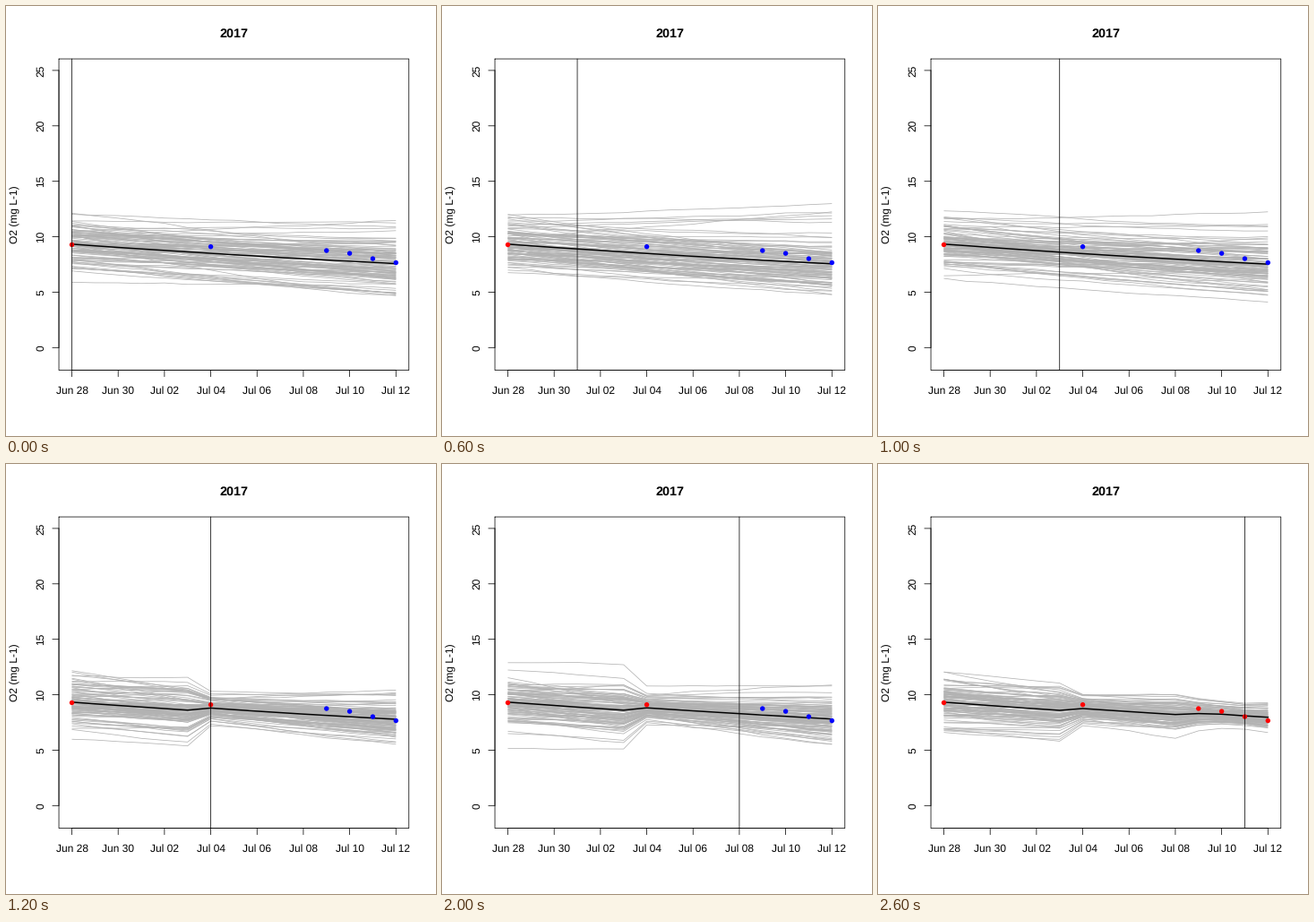
A matplotlib script that plays this animation: 480x480 px, repeating every 2800 ms.

```python
import numpy as np
import matplotlib.pyplot as plt
from matplotlib.animation import FuncAnimation
from matplotlib.collections import LineCollection

SIZE, DPI = 480, 72
FRAMES, INTERVAL = 14, 200
LEFT, RIGHT, TOP, BOTTOM = 59.04, 449.76, 59.04, 406.56
MEMBERS = 100
DAYS = np.arange(15)
OBS = {0: 9.28, 6: 9.1, 11: 8.75, 12: 8.5, 13: 8.02, 14: 7.66}

START, START_SD = 9.33, 1.17     # oxygen on the first day
DECAY, DECAY_SD = 0.0162, 0.0108  # daily loss rate of the members
NOISE_SD = 0.05                  # daily model error
OBS_VAR = 1.35                   # observation error variance

plt.rcParams["text.hinting"] = "none"


def px(day):
    """Horizontal pixel of a day counted from Jun 28."""
    return LEFT + (RIGHT - LEFT) * (day + 0.56) / 15.12


def py(value):
    """Vertical pixel of an oxygen value."""
    return BOTTOM - (BOTTOM - TOP) * (value + 2.04) / 28.08


def standard_normal(rng):
    z = rng.normal(size=MEMBERS)
    return (z - z.mean()) / z.std()


def ensemble(today):
    """Decaying members, pulled to each observation made up to today."""
    rng = np.random.RandomState(today + 40)
    x = START + START_SD * standard_normal(rng)
    rate = DECAY + DECAY_SD * standard_normal(rng)
    states = [x]
    for day in DAYS[1:]:
        x = x * np.exp(-rate) + rng.normal(0, NOISE_SD, MEMBERS)
        if day in OBS and day <= today:
            gain = x.var() / (x.var() + OBS_VAR)
            x = x + gain * (OBS[day] - x)
        states.append(x)
    return np.array(states).T


fig = plt.figure(figsize=(SIZE / DPI, SIZE / DPI), dpi=DPI, facecolor="white")
ax = fig.add_axes([0, 0, 1, 1])
ax.set_xlim(0, SIZE)
ax.set_ylim(SIZE, 0)
ax.axis("off")


def stroke(xs, ys, zorder=5):
    line, = ax.plot(xs, ys, color="black", lw=0.75, snap=False, zorder=zorder,
                    solid_capstyle="round", solid_joinstyle="round")
    return line


def label(x, y, text, **kw):
    kw = {"fontsize": 12, **kw}
    ax.text(x, y, text, family="Liberation Sans", ha="center", va="baseline",
            rotation_mode="anchor", **kw)


# Frame, then the two axes drawn over it with their ticks
stroke([LEFT, RIGHT, RIGHT, LEFT, LEFT], [TOP, TOP, BOTTOM, BOTTOM, TOP])
stroke([px(0), px(14)], [BOTTOM] * 2)
stroke([LEFT] * 2, [py(0), py(25)])
for day in range(0, 15, 2):
    stroke([px(day)] * 2, [BOTTOM, BOTTOM + 7.2])
    name = f"Jun {28 + day}" if day < 3 else f"Jul {day - 2:02d}"
    label(px(day), 433, name)
for value in range(0, 26, 5):
    stroke([LEFT - 7.2, LEFT], [py(value)] * 2)
    label(42, py(value), str(value), rotation=90)
label((LEFT + RIGHT) / 2, 35, "2017", fontsize=14.4, weight="bold")
label(13.6, (TOP + BOTTOM) / 2, "O2 (mg L-1)", rotation=90)

members = LineCollection([], colors="#b2b2b2", linewidths=0.75, zorder=1)
ax.add_collection(members)
mean_line, = ax.plot([], [], color="black", lw=1.5, zorder=2)
dots = ax.scatter([px(d) for d in OBS], [py(v) for v in OBS.values()],
                  s=5.4 ** 2, linewidths=0, snap=False, zorder=3)
now_line = stroke([], [], zorder=4)


def draw(today):
    paths = ensemble(today)
    xs = px(DAYS)
    members.set_segments([np.column_stack([xs, py(p)]) for p in paths])
    mean_line.set_data(xs, py(paths.mean(axis=0)))
    done = today == FRAMES - 1
    dots.set_facecolor(["red" if done or d <= today else "blue" for d in OBS])
    now_line.set_data([px(today)] * 2, [TOP, BOTTOM])
    return members, mean_line, dots, now_line


anim = FuncAnimation(fig, draw, frames=FRAMES, interval=INTERVAL,
                     repeat=True, repeat_delay=0, blit=False)
plt.show()
```
